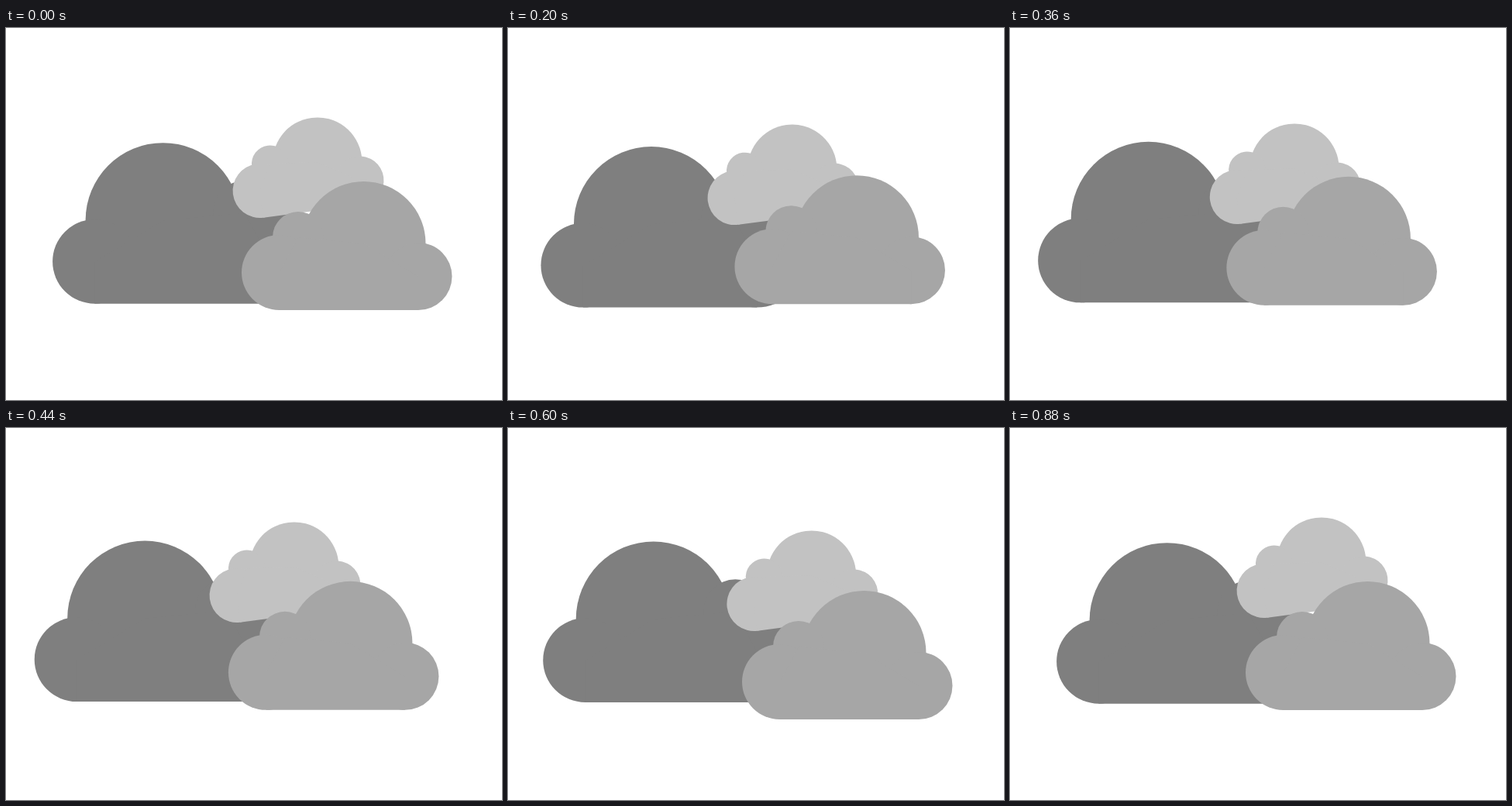
Recreate the animation shown at these times as an HTML page. Size 640x480 px, loop 0.92 s.

```html
<!DOCTYPE html>
<html lang="en">
<head>
<meta charset="utf-8">
<title>Clouds</title>
<style>
  html, body { margin: 0; width: 100%; height: 100%; overflow: hidden; background: #fff; }
  svg { display: block; width: 640px; height: 480px; }
</style>
</head>
<body>
<svg viewBox="0 0 640 480">
  <defs>
    <g id="cloud">
      <circle r="80"/>
      <circle cx="-84.5" cy="-8" r="33"/>
      <circle cx="-109" cy="37.5" r="48.5"/>
      <circle cx="70.5" cy="42.5" r="43.5"/>
      <path d="M-109 86V37.5L-84.5 -8L0 0L70.5 42.5V86Z"/>
    </g>
  </defs>
  <g id="dark"><use href="#cloud" fill="#7f7f7f" transform="translate(202.6 248.2) scale(-1.25 1.25)"/></g>
  <g id="light"><use href="#cloud" fill="#c2c2c2" transform="translate(401.8 173) rotate(-7.5) scale(.72)"/></g>
  <g id="mid"><use href="#cloud" fill="#a6a6a6" transform="translate(461.5 278)"/></g>
</svg>
<script>
  const STEP = 40, STEPS = 23;
  const rest = step => ({ step, x: 0, y: 0 });
  const turn = (step, x, y) => ({ step, x, y });

  // Each cloud drifts in straight lines from rest, through its turning points, back to rest.
  const drift = (...turns) => [rest(0), ...turns, rest(STEPS - 1)];
  const drifts = {
    dark: drift(turn(3, -14.5, 8), turn(10, -25.5, -2.9)),
    light: drift(turn(6, -42, 11), turn(11, -30, 6), turn(15, -10.2, 17), turn(19, -6, 6)),
    mid: drift(turn(3, -5, -8.5), turn(9, -24.6, -6.2), turn(15, -2, 12))
  };

  const mix = (a, b, k) => a + (b - a) * k;

  function offsetAt(path, step) {
    const next = Math.max(1, path.findIndex(point => point.step >= step));
    const from = path[next - 1], to = path[next];
    const k = (step - from.step) / (to.step - from.step);
    return [mix(from.x, to.x, k), mix(from.y, to.y, k)];
  }

  function draw() {
    const step = Math.floor(performance.now() / STEP) % STEPS;
    for (const [id, path] of Object.entries(drifts)) {
      document.getElementById(id).setAttribute("transform", `translate(${offsetAt(path, step)})`);
    }
    requestAnimationFrame(draw);
  }
  draw();
</script>
</body>
</html>
```
